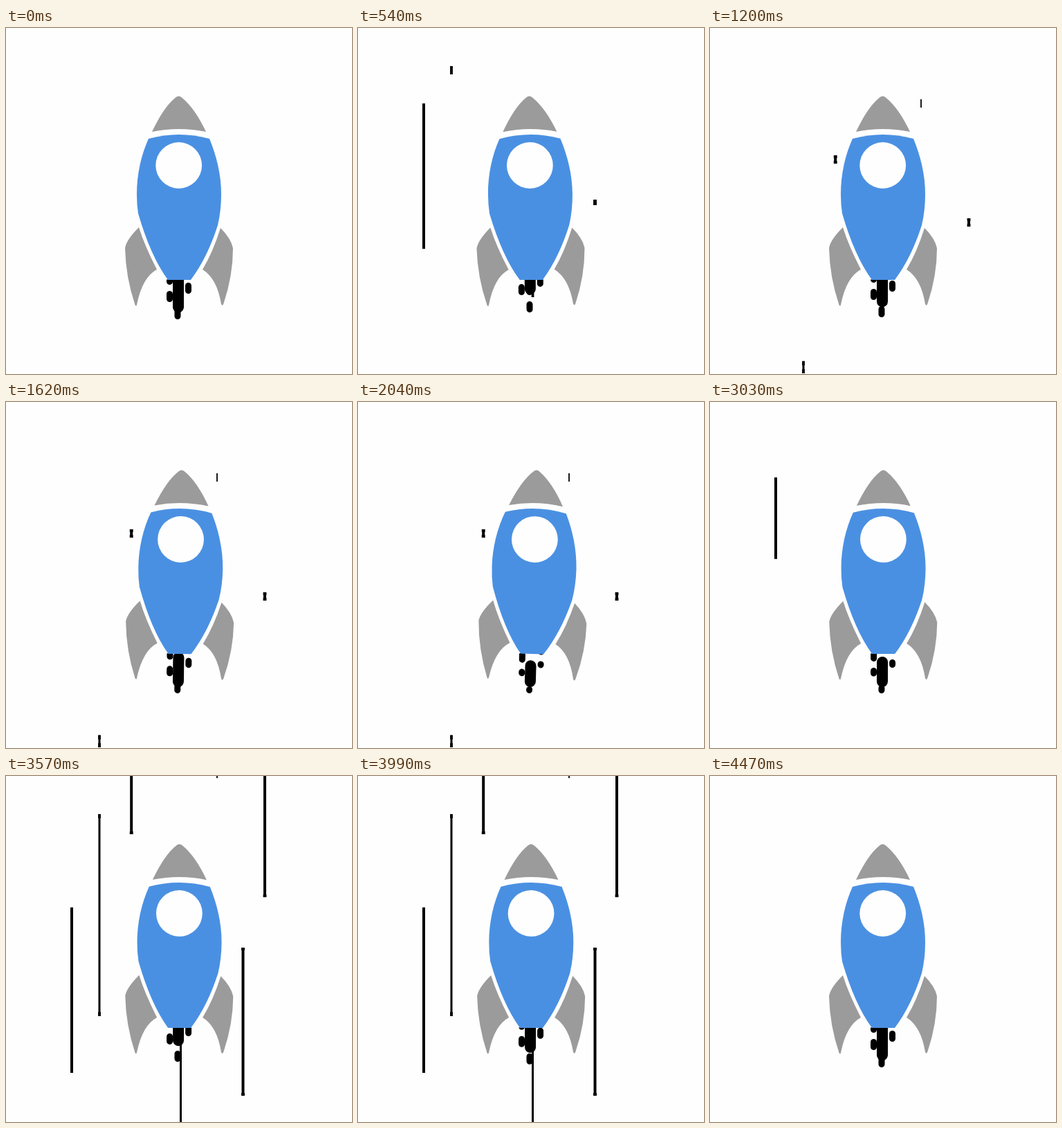
These frames come from a looping animation (500 px wide and 500 px high, 4530 ms). An HTML page with a canvas:

```html
<!DOCTYPE html>
<html>
<head>
<meta charset="utf-8">
<style>
  html, body { margin: 0; width: 100%; height: 100%; overflow: hidden; background: #fefefe; }
  canvas { display: block; }
</style>
</head>
<body>
<canvas id="stage" width="500" height="500"></canvas>
<script>
const ctx = document.getElementById('stage').getContext('2d');
const LOOP = 4530, STEP = 30, LAST = 4470;
const STREAK_CYCLE = 420, STREAKS_END = 4200;
const GREY = '#9b9b9b', BLUE = '#4a90e2', PAPER = '#fefefe';

const nose = new Path2D('M211 150Q228 114 245 100.5Q249.5 96.5 254 100.5Q273 116 289 150Q250 142 211 150Z');
const hull = new Path2D('M206 160Q250 148 294 160C304 184 311 212 311 240Q311 264 306 285Q291 332 267 364L234 364Q209 330 191 268Q189 255 189 240C189 212 195 184 206 160Z');
const fins = new Path2D('M192 288Q200 314 218 349Q197 360 189 400Q188 403 186.5 400Q173 360 172 318Q174 306 192 288Z' +
  'M310 289Q325 304 328 318Q328 358 314.5 398Q313 403 311 399Q305 362 284 349Q299 324 310 289Z');

const streaks = [
  { x: 95, y: 109, length: 312, width: 4, start: 30, lag: 130 },
  { x: 135, y: 55, length: 432, width: 3, cap: 6 },
  { x: 181.2, y: -130, length: 318, width: 4 },
  { x: 252.5, y: 381, length: 318, width: 3 },
  { x: 305, y: -211, length: 318, width: 1.8 },
  { x: 342.5, y: 248, length: 318, width: 4 },
  { x: 374, y: -39, length: 318, width: 4 }
];

// Exhaust dashes: each slides down its own path and repeats
const jets = [
  { x: 249, width: 16, top: 307.2, size: 54, speed: 2.64, end: 412 },
  { x: 236.5, width: 9, top: 361, size: 16, speed: 1, end: 396.5 },
  { x: 248, width: 9, top: 386, size: 16, speed: 1, end: 421 },
  { x: 263.5, width: 9, top: 349, size: 16, speed: 1, end: 384 }
];
const DASH = 25;

const tiltKeys = [[0, 0], [540, -0.38], [1200, 0], [2040, 1.62], [3030, 0.2], [3570, 0.2], [4470, 0]];
const flowKeys = [[0, 19], [540, 34], [1200, 41], [2040, 50], [3030, 73], [3570, 86], [4470, 94]];

const clamp = v => Math.min(1, Math.max(0, v));
const smooth = v => { v = clamp(v); return v * v * (3 - 2 * v); };
const linear = v => v;

function valueAt(keys, t, ease) {
  const i = Math.max(1, keys.findIndex(k => k[0] >= t));
  const [t0, a] = keys[i - 1], [t1, b] = keys[i];
  return a + (b - a) * ease((t - t0) / (t1 - t0));
}

function drawStreak({ x, y, length, width, start = 120, lag = 100, cap = 4 }, phase) {
  const age = phase - start;
  if (age < 0 || age >= 300) return;
  const top = y + length * smooth(age / 150);
  const tail = y + length * smooth((age - lag) / 150);
  const bottom = top + 2 * cap;
  ctx.fillRect(x - width / 2, tail, width, bottom - tail);
  if (start === 120 && width > 2) {
    const wide = width + 0.8;
    ctx.fillRect(x - wide / 2, tail, wide, cap);
    ctx.fillRect(x - wide / 2, bottom - cap, wide, cap);
  }
}

function drawJet({ x, width, top, size, speed, end }, flow) {
  const r = width / 2;
  ctx.lineWidth = width;
  for (let n = -1; n <= 1; n++) {
    const y = top + speed * (flow + n * DASH);
    const from = y + r, to = Math.min(y + size, end) - r;
    if (from > end - r) continue;
    ctx.beginPath();
    ctx.moveTo(x, from);
    ctx.lineTo(x, to + 0.01);
    ctx.stroke();
  }
}

function fill(path, color) {
  ctx.fillStyle = color;
  ctx.fill(path);
}

function draw(t) {
  ctx.fillStyle = PAPER;
  ctx.fillRect(0, 0, 500, 500);

  ctx.fillStyle = '#000';
  if (t < STREAKS_END) streaks.forEach(s => drawStreak(s, t % STREAK_CYCLE));

  ctx.save();
  ctx.translate(250, 400);
  ctx.rotate(valueAt(tiltKeys, t, smooth) * Math.PI / 180);
  ctx.translate(-250, -400);

  ctx.strokeStyle = '#000';
  ctx.lineCap = 'round';
  // A completed dash sits at the end of its range, not at zero
  const flow = (valueAt(flowKeys, t, linear) - 0.01) % DASH;
  // Exhaust only shows below the hull
  ctx.save();
  ctx.beginPath();
  ctx.rect(200, 363.5, 100, 80);
  ctx.clip();
  jets.forEach(j => drawJet(j, flow));
  ctx.restore();

  fill(fins, GREY);
  fill(nose, GREY);
  fill(hull, BLUE);
  ctx.fillStyle = PAPER;
  ctx.beginPath();
  ctx.arc(249.7, 198.5, 33.4, 0, Math.PI * 2);
  ctx.fill();
  ctx.restore();
}

const begin = performance.now();
function tick() {
  const t = (performance.now() - begin) % LOOP;
  draw(Math.min(LAST, Math.floor(t / STEP) * STEP));
  requestAnimationFrame(tick);
}
tick();
</script>
</body>
</html>
```
